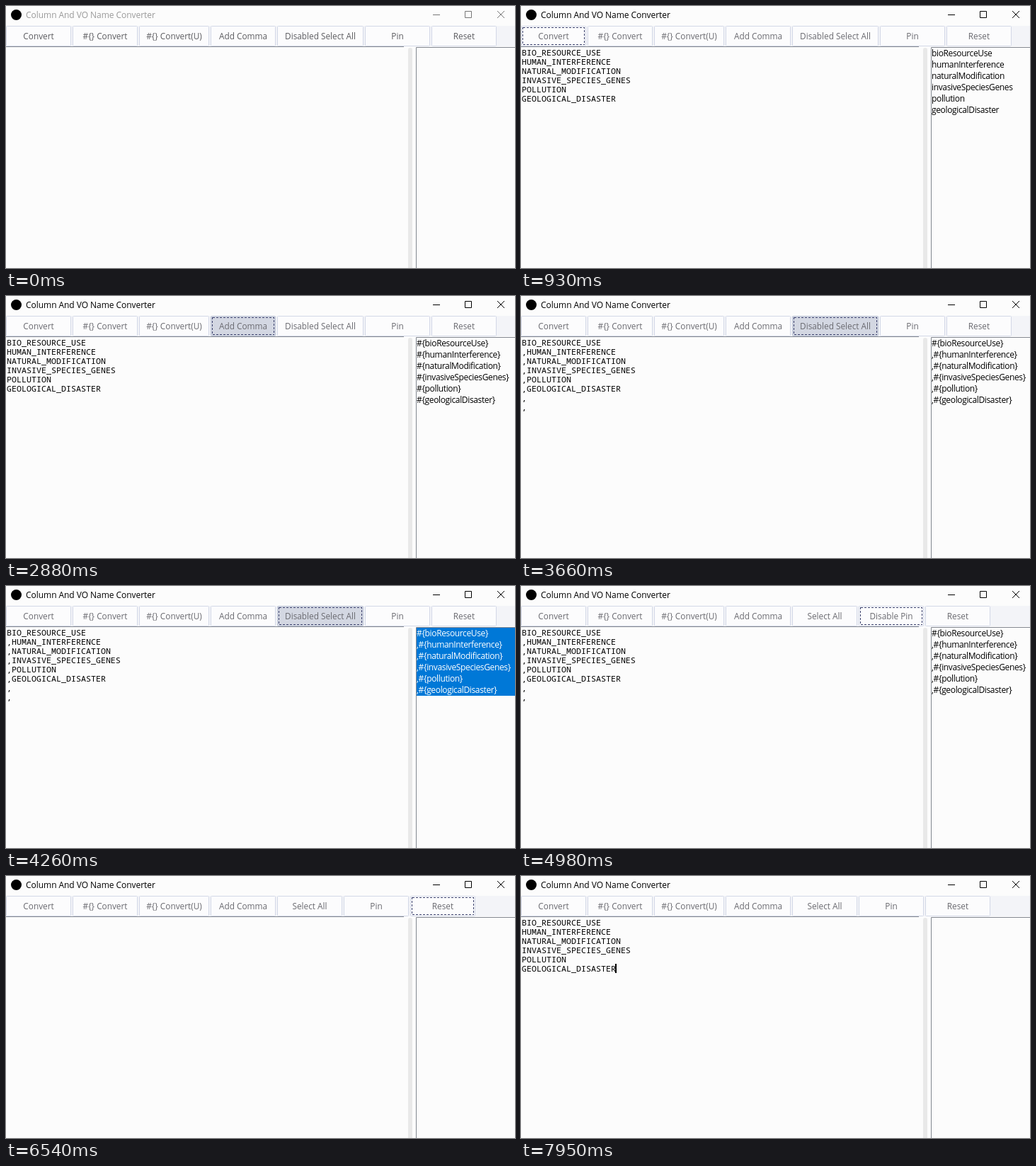
An HTML page for the animation above (8000 ms loop, 719x370 px).

```html
<!DOCTYPE html>
<html lang="en">
<head>
<meta charset="utf-8">
<title>Column And VO Name Converter</title>
<style>
html, body { margin: 0; width: 100%; height: 100%; overflow: hidden; background: #fcfcfc; }
svg { display: block; font-family: "Open Sans", "Noto Sans", sans-serif; }
text { white-space: pre; }
.title { font-size: 12px; letter-spacing: -.05px; fill: #9a9a9a; }
.controls { fill: none; stroke: #777; }
.active .title { fill: #000; }
.active .controls { stroke: #000; }
.button rect { fill: #fcfcfd; stroke: #d3d8e7; }
.button text { font-size: 11.8px; fill: #5c5c60; text-anchor: middle; }
.active .button text { fill: #6a6a70; }
.button.pressed rect { fill: #d3d7e2; stroke: #bcc4d6; }
.button .ring { fill: none !important; stroke: #3c426e !important; stroke-dasharray: 3 2; shape-rendering: crispEdges; }
.left { font: 11.667px "Noto Sans Mono", "DejaVu Sans Mono", monospace; fill: #000; }
.right { font-size: 12px; letter-spacing: -.36px; fill: #000; }
.selected .right { fill: #fff; }
.selection { fill: #0078d7; visibility: hidden; }
.selected .selection { visibility: visible; }
</style>
</head>
<body>
<svg id="stage" width="719" height="370" viewBox="0 0 719 370">
  <rect width="719" height="370" fill="#fcfcfc"/>
  <circle cx="14.5" cy="12.5" r="7.5"/>
  <text class="title" x="28" y="17">Column And VO Name Converter</text>
  <path class="controls" d="M603 12.5h10M648.5 7.5h9v9h-9zM694 7l10 10M704 7l-10 10"/>
  <rect y="28" width="719" height="29" fill="#f3f4f8"/>
  <g id="toolbar"></g>
  <path d="M0 57.5H562M579.5 370V58.5H719" fill="none" stroke="#828790"/>
  <rect x="568" y="59" width="6" height="330" rx="3" fill="#e9e9e9"/>
  <rect class="selection" x="580" y="59" width="139" height="96"/>
  <g id="left" class="left"></g>
  <g id="right" class="right"></g>
  <rect id="caret" width="2" height="13"/>
</svg>
<script>
const LOOP = 8000, CELL = 7, LEFT_ROW = 13, RIGHT_ROW = 16, TOP = 59;
const $ = id => document.getElementById(id);

const columns = ['BIO_RESOURCE_USE', 'HUMAN_INTERFERENCE', 'NATURAL_MODIFICATION',
  'INVASIVE_SPECIES_GENES', 'POLLUTION', 'GEOLOGICAL_DISASTER'];
const camel = name => name.toLowerCase().replace(/_(.)/g, (_, c) => c.toUpperCase());
const commas = rows => rows.map((row, i) => (i ? ',' : '') + row);
const fields = columns.map(camel);
const params = fields.map(name => `#{${name}}`);

const CONVERT = 0, PARAM = 1, COMMA = 3, SELECT = 4, PIN = 5, RESET = 6;
const widths = { '#{} Convert(U)': 99, 'Disabled Select All': 122 };

const start = {
  active: false, selected: false, left: [], right: [], caret: null,
  focus: -1, pressed: false, select: 'Disabled Select All', pin: 'Pin'
};
const press = focus => ({ focus, pressed: true, caret: null });
const release = change => ({ pressed: false, ...change });

// Each step changes part of the state; carets are [column, row].
const steps = [
  [0, {}],
  [180, { active: true, caret: [0, 0] }],
  [360, { left: columns, caret: [0, 6] }],
  [840, press(CONVERT)],
  [930, release({ right: fields })],
  [2100, press(PARAM)],
  [2160, release({ right: params })],
  [2880, press(COMMA)],
  [2940, release({ left: commas([...columns, '', '']), right: commas(params) })],
  [3660, press(SELECT)],
  [3720, release({ selected: true })],
  [4260, press(SELECT)],
  [4350, release({ selected: false, select: 'Select All' })],
  [4890, press(PIN)],
  [4980, release({ pin: 'Disable Pin' })],
  [5670, press(PIN)],
  [5730, release({ pin: 'Pin' })],
  [6510, press(RESET)],
  [6540, release({ left: [], right: [] })],
  [7140, { focus: -1, caret: [0, 0] }],
  [7440, { left: columns, caret: [0, 6] }],
  [7950, { caret: [19, 5] }]
];
let last = start;
const states = steps.map(([, change]) => last = { ...last, ...change });

function toolbar({ select, pin, focus, pressed }) {
  const labels = ['Convert', '#{} Convert', '#{} Convert(U)', 'Add Comma', select, pin, 'Reset'];
  let x = 0;
  return labels.map((label, i) => {
    const w = widths[label] || 92, on = i === focus;
    const ring = on ? `<rect class="ring" x="${x + 2.5}" y="30.5" width="${w - 5}" height="24"/>` : '';
    const html = `<g class="button${on && pressed ? ' pressed' : ''}">
      <rect x="${x + .5}" y="28.5" width="${w - 1}" height="28" rx="1"/>${ring}
      <text x="${x + w / 2}" y="47">${label}</text></g>`;
    x += w + 2;
    return html;
  }).join('');
}

const lines = (rows, x, y, pitch) =>
  rows.map((row, i) => `<text x="${x}" y="${y + i * pitch}">${row}</text>`).join('');

function draw(state) {
  $('stage').classList.toggle('active', state.active);
  $('stage').classList.toggle('selected', state.selected);
  $('toolbar').innerHTML = toolbar(state);
  $('left').innerHTML = lines(state.left, 1, TOP + 11, LEFT_ROW);
  $('right').innerHTML = lines(state.right, 580, TOP + 12, RIGHT_ROW);
  const [col, row] = state.caret || [0, 0];
  $('caret').setAttribute('visibility', state.caret ? 'visible' : 'hidden');
  $('caret').setAttribute('x', Math.max(1, col * CELL));
  $('caret').setAttribute('y', TOP + row * LEFT_ROW);
}

const begin = performance.now();
let shown = -1;
function tick() {
  const t = (performance.now() - begin) % LOOP;
  const index = steps.findLastIndex(([at]) => at <= t);
  if (index !== shown) draw(states[shown = index]);
  requestAnimationFrame(tick);
}
tick();
</script>
</body>
</html>
```
